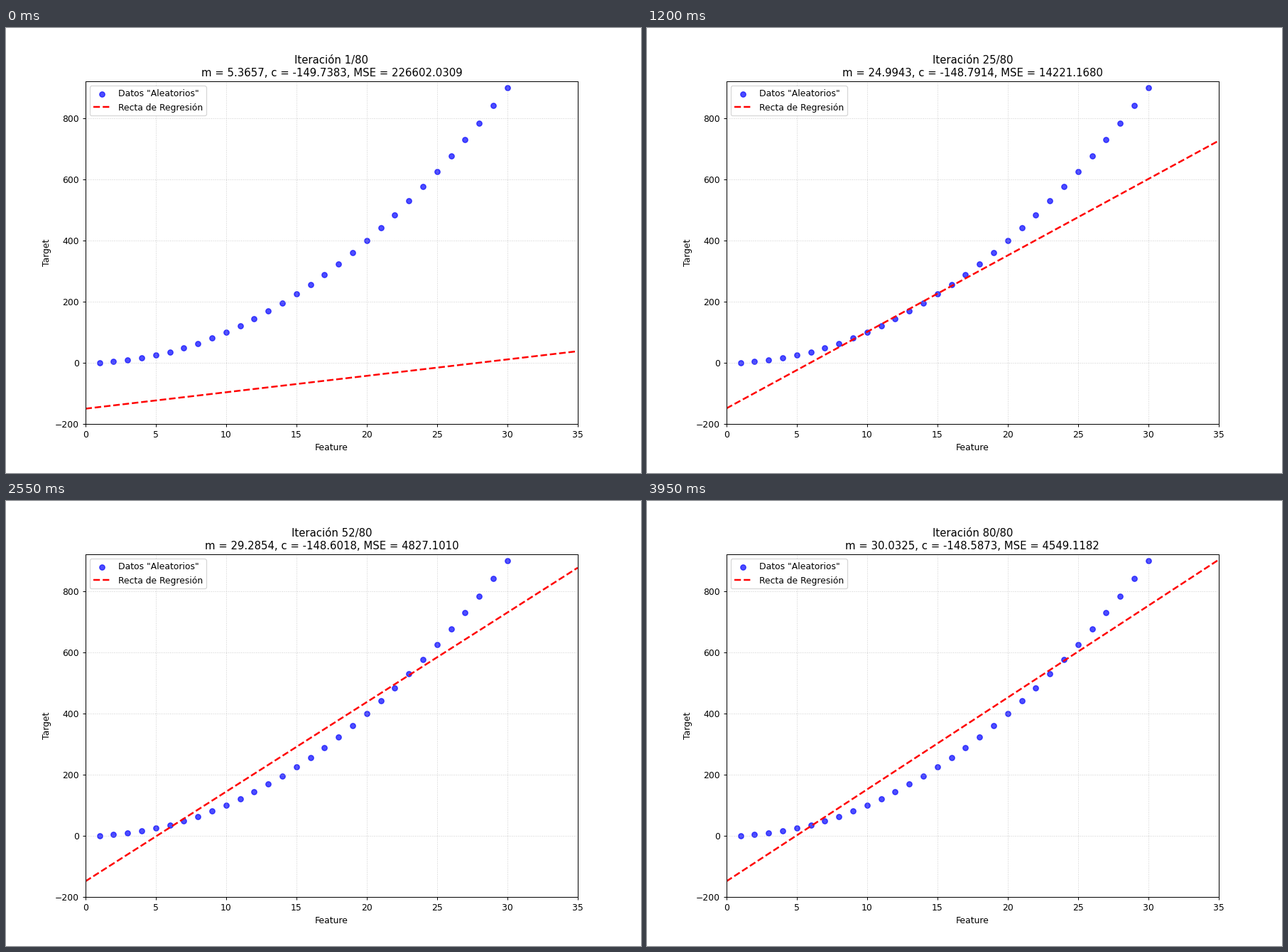
A matplotlib script for the animation above (4 s loop, 894 px wide and 626 px high).

```python
import numpy as np
import matplotlib.pyplot as plt
from matplotlib.animation import FuncAnimation

STEPS = 80
WARMUP = 2
RATE = 1e-4

x = np.arange(1, 31, dtype=float)
y = x ** 2


def descend(m, c, count):
    """Gradient descent; each row is (m, c, error before the update)."""
    rows = []
    for _ in range(count):
        err = m * x + c - y
        m -= RATE * 2 * np.mean(err * x)
        c -= RATE * 2 * np.mean(err)
        rows.append((m, c, np.mean(err ** 2)))
    return rows


history = descend(0.0, -150.0, STEPS + WARMUP)[WARMUP:]

# 10 x 7 inches at this dpi is 894 x 626 pixels
fig, ax = plt.subplots(figsize=(10, 7), dpi=89.43)
ax.scatter(x, y, color="blue", alpha=0.7, label='Datos "Aleatorios"')
span = np.array([0, 35])
line, = ax.plot(span, span, "r--", lw=2, label="Recta de Regresión")
ax.set(xlim=(0, 35), ylim=(-200, 920), xlabel="Feature", ylabel="Target")
ax.grid(True, linestyle=":", alpha=0.6)
ax.legend(loc="upper left")


def update(i):
    m, c, mse = history[i]
    line.set_ydata(m * span + c)
    ax.set_title(f"Iteración {i + 1}/{STEPS}\n"
                 f"m = {m:.4f}, c = {c:.4f}, MSE = {mse:.4f}")
    return line,


anim = FuncAnimation(fig, update, frames=STEPS, interval=50,
                     repeat=True, repeat_delay=0, blit=False)
plt.show()
```
